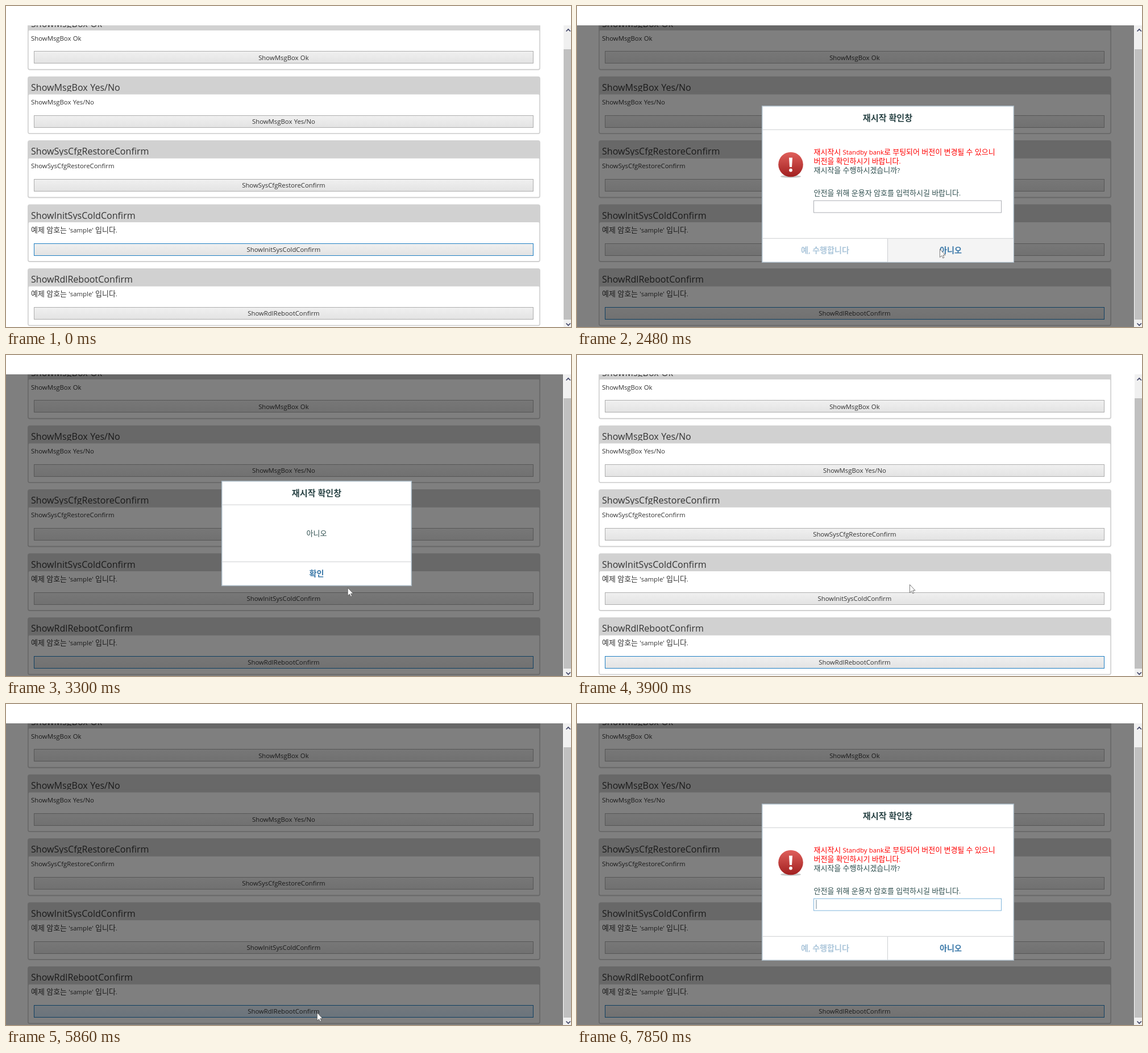
An HTML page that plays this animation: 994 px wide and 564 px high, repeating every 8 s.

```html
<!DOCTYPE html>
<html lang="ko">
<head>
<meta charset="utf-8">
<style>
  html, body { margin: 0; width: 100%; height: 100%; overflow: hidden; background: #fff; }
  svg { display: block; }
  text { font: 11.35px "Open Sans", "Noto Sans CJK KR", sans-serif; word-spacing: .34px; fill: #333; white-space: pre; }
  .k { font-family: "Noto Sans CJK KR", "Noto Sans CJK", sans-serif; font-size: 1.145em; }
  .head { font-size: 16.07px; }
  .title { font-size: 13.25px; font-weight: bold; fill: #2a4446; }
  .cmd { font-size: 12.3px; font-weight: bold; fill: #3a78a8; }
  .slate { fill: #2f4f4f; }
  .red { fill: #f00; }
  .mid { text-anchor: middle; }
  .off { opacity: .42; }
</style>
</head>
<body>
<svg id="stage" width="994" height="564" viewBox="0 0 994 564"></svg>
<script>
const stage = document.getElementById('stage');
const $ = id => document.getElementById(id);
const DURATION = 8000, PITCH = 112.4;

const rect = (x, y, w, h, fill, more = '') =>
  `<rect x="${x}" y="${y}" width="${w}" height="${h}" fill="${fill}" ${more}/>`;
const text = (x, y, s, cls = '') =>
  `<text x="${x}" y="${y}" class="${cls}">${s.replace(/[가-힣]+/g, '<tspan class="k">$&</tspan>')}</text>`;
const shade = (id, a, b) =>
  `<linearGradient id="${id}" x2="0" y2="1"><stop stop-color="${a}"/><stop offset="1" stop-color="${b}"/></linearGradient>`;
const line = (d, color) => `<path d="${d}" fill="none" stroke="${color}"/>`;

function card(name, i) {
  const y = 11.3 + i * PITCH;
  const top = Math.round(y + 68);
  const label = i > 2 ? "예제 암호는 'sample' 입니다." : name;
  return rect(38, y, 902, 101.4, '#d1d1d1', 'rx="4"') +
    rect(39.7, y + 31.5, 898.6, 68, '#fff', 'rx="2"') +
    text(44, y + 25.2, name, 'head') +
    rect(40, y + 26.7, 898, 4.8, '#d1d1d1') +
    text(44, y + 49.3, label) +
    rect(49.5, top + .5, 878, 21, 'url(#normal)', `id="btn${i}" stroke="#adadad"`) +
    text(488.4, y + 83.3, name, 'mid');
}

function frame(x, y, w, h) {
  return rect(x, y, w, h, '#fff', 'stroke="#a9b8c4" stroke-width="1.5"') +
    line(`M${x} ${y + 41.5}h${w}M${x} ${y + h - 42}h${w}`, '#cdcfd1');
}

const icon =
  '<ellipse cx="376" cy="299.5" rx="18" ry="2.5" fill="#c9c9c9"/>' +
  '<circle cx="376" cy="278.5" r="21.8" fill="url(#ball)"/>' +
  '<path d="M373 266.5h6l-1 16.5h-4z" fill="#fff"/><circle cx="376" cy="288.5" r="2.9" fill="#fff"/>';

const confirmBox = frame(325.7, 175.8, 442.6, 274.5) +
  rect(547, 409, 220.5, 40.5, '#f4f4f4', 'id="noHover"') +
  line('M546.5 409v41', '#cdcfd1') +
  text(546.5, 201.8, '재시작 확인창', 'title mid') + icon +
  text(416.5, 260.8, '재시작시 Standby bank로 부팅되어 버전이 변경될 수 있으니', 'red') +
  text(416.5, 276.8, '버전을 확인하시기 바랍니다.', 'red') +
  text(416.5, 292.8, '재시작을 수행하시겠습니까?', 'slate') +
  text(416.5, 333, '안전을 위해 운용자 암호를 입력하시길 바랍니다.', 'slate') +
  rect(416.5, 342, 330, 21, '#fff', 'id="field" stroke="#abadb3"') +
  rect(420.5, 344, 1, 16, '#6d8494', 'id="caret"') +
  text(436.5, 434.3, '예, 수행합니다', 'cmd mid off') +
  text(657.5, 434.3, '아니오', 'cmd mid');

const resultBox = frame(379.7, 221.7, 333.6, 183.6) +
  rect(380.5, 364, 332, 40.5, '#f4f4f4', 'id="okHover"') +
  text(546.5, 247.8, '재시작 확인창', 'title mid') +
  text(546.5, 318, '아니오', 'slate mid') +
  text(546.5, 389.3, '확인', 'cmd mid');

const names = ['ShowMsgBox Ok', 'ShowMsgBox Yes/No', 'ShowSysCfgRestoreConfirm',
  'ShowInitSysColdConfirm', 'ShowRdlRebootConfirm'];

stage.innerHTML = '<defs>' + shade('normal', '#f0f0f0', '#e3e3e3') +
  shade('hover', '#e8f3fc', '#d6e9fa') + shade('pressed', '#daecfc', '#c4e0fc') +
  shade('ball', '#e0605c', '#a11f1f') + '</defs>' +
  names.map(card).join('') +
  rect(0, 34, 980, 530, '#000', 'id="dim" opacity=".5"') +
  rect(0, 0, 994, 34, '#fff') +
  rect(981, 34, 13, 530, '#f0f0f0') + rect(981, 76, 13, 475, '#c0c0c0') +
  '<path d="M985.5 44.5l3.7-3.7 3.7 3.7M985.5 557.5l3.7 3.7 3.7-3.7" fill="none" stroke="#44486a" stroke-width="1.7"/>' +
  `<g id="confirm">${confirmBox}</g><g id="result">${resultBox}</g>` +
  '<path id="arrow" d="M.4.4V14.6L3.6 11.6 5.8 16 7.8 15.1 5.8 10.7H10Z" fill="#fff" stroke="#555" stroke-width=".8"/>' +
  '<path id="beam" d="M520.5 341.5h2.5l.5.5.5-.5h2.5M523.5 342v11M520.5 353.5h2.5l.5-.5.5.5h2.5" fill="none" stroke="#444"/>';

// Pointer path: time, x, y
const path = [
  [0, 540, 570], [360, 540, 563], [680, 561, 537], [1350, 561, 537],
  [2070, 565, 410], [2160, 567, 410], [2480, 638, 427], [2700, 638, 427],
  [2830, 631, 419], [2960, 631, 419], [3480, 585, 403], [3970, 585, 403],
  [4670, 540, 538], [4760, 537, 545], [4910, 533, 556], [5159, 533, 556],
  [5160, 533, 570], [5319, 533, 570], [5320, 535, 560], [5580, 547, 542],
  [5960, 547, 542], [6620, 523, 337], [6690, 523, 337], [6800, 523, 316],
  [7020, 523, 316], [7120, 523, 341], [8000, 523, 341]
];

function pointer(t) {
  const i = Math.max(1, path.findIndex(p => p[0] > t));
  const [t0, x0, y0] = path[i - 1], [t1, x1, y1] = path[i];
  const k = (t - t0) / (t1 - t0);
  return [x0 + (x1 - x0) * k, y0 + (y1 - y0) * k];
}

const within = (t, ...spans) => spans.some(([a, b]) => t >= a && t < b);
const show = (id, on) => $(id).setAttribute('display', on ? 'inline' : 'none');

function draw(t) {
  const [x, y] = pointer(t);
  const confirm = within(t, [1350, 2700], [5960, DURATION]);
  const result = within(t, [2960, 3760]);
  const focus = t < 900 ? 3 : 4;

  show('dim', within(t, [1170, 2700], [2830, 3900], [5860, DURATION]));
  show('confirm', confirm);
  show('result', result);
  show('noHover', x > 546 && y >= 409 && y < 450);
  show('okHover', x > 380 && x < 713 && y > 364 && y < 406);
  show('caret', t >= 7560);
  $('field').setAttribute('stroke', t >= 7560 ? '#7fb5dc' : '#abadb3');

  names.forEach((_, i) => {
    const b = $('btn' + i), top = +b.getAttribute('y');
    const over = !confirm && !result && y >= top && y < top + 21;
    const down = over && within(t, [850, 980], [5680, 5780]);
    b.setAttribute('fill', `url(#${down ? 'pressed' : over ? 'hover' : 'normal'})`);
    b.setAttribute('stroke', i === focus ? '#1f7fc3' : over ? '#7eb4ea' : '#adadad');
  });

  show('arrow', t < 7120);
  $('arrow').setAttribute('transform', `translate(${x} ${y})`);
  show('beam', within(t, [7120, 7680]));
}

function tick() {
  draw(performance.now() % DURATION);
  requestAnimationFrame(tick);
}
tick();
</script>
</body>
</html>
```
